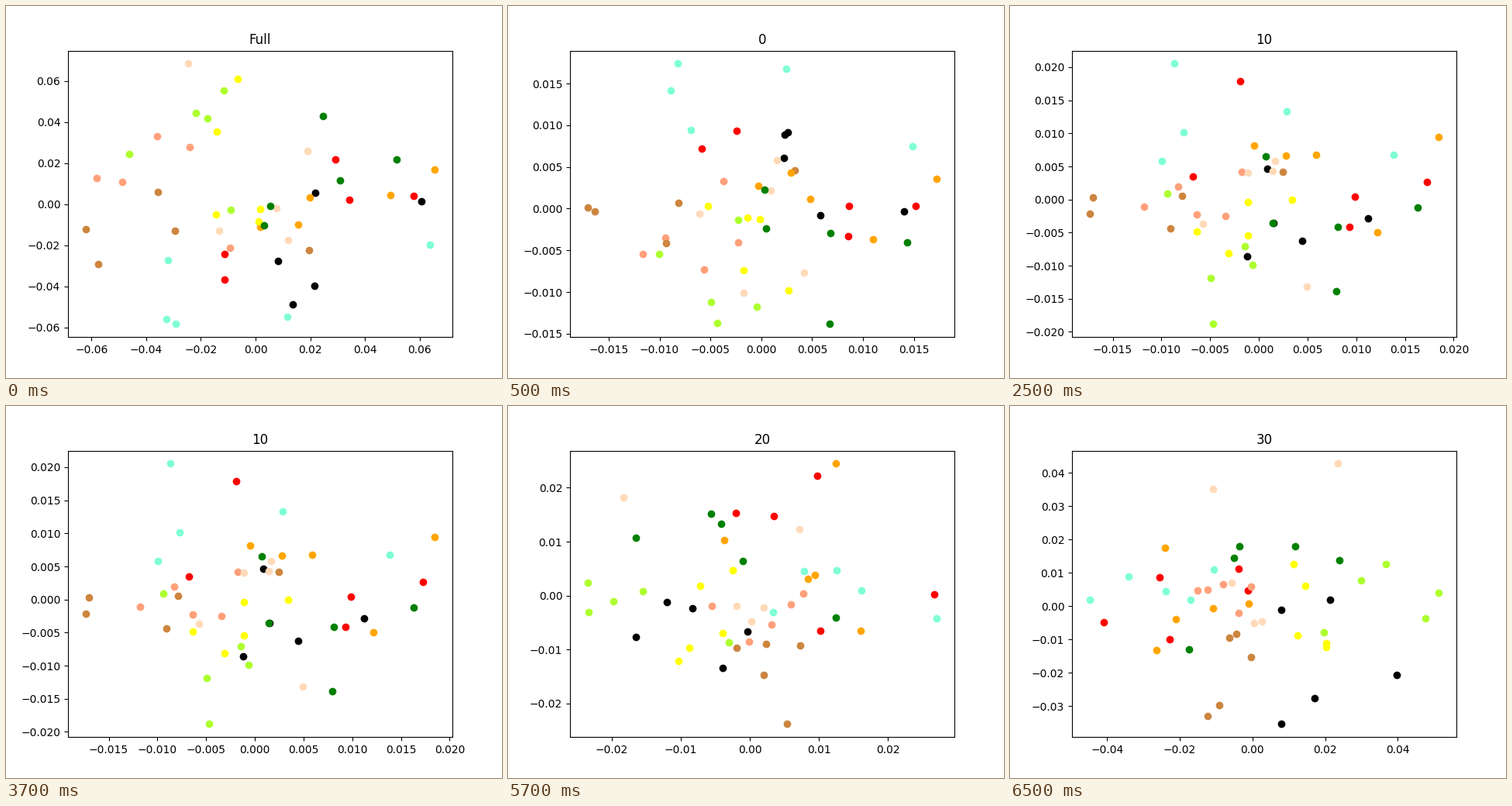
Animation of 640 by 480 pixels, one loop 8000 ms. Source, as a matplotlib script:

```python
import matplotlib.pyplot as plt
import numpy as np
from matplotlib.animation import FuncAnimation

WIDTH, HEIGHT, DPI = 640, 480, 100
STEP_MS = 500
STEPS = 16

fig, ax = plt.subplots(figsize=(WIDTH / DPI, HEIGHT / DPI), dpi=DPI)
box = ax.get_position()
snapshots = []


def to_data(points, xlim, ylim):
    """Turn stage positions (y down) into data values for the given limits."""
    u = (np.array(points, float) / (WIDTH, HEIGHT) - (box.x0, 1 - box.y1)) / box.size
    x = xlim[0] + u[:, 0] * (xlim[1] - xlim[0])
    y = ylim[1] - u[:, 1] * (ylim[1] - ylim[0])
    return x, y


def snapshot(title, xlim, ylim, **clusters):
    """Register one scatter plot; clusters are drawn in the order given."""
    data = {color: to_data(points, xlim, ylim) for color, points in clusters.items()}
    snapshots.append((title, xlim, ylim, data))


snapshot(
    "Full", (-0.0686, 0.0720), (-0.06479, 0.07468),
    black=[(399, 241), (536, 252), (351, 329), (398, 361), (370, 385)],
    red=[(425, 198), (443, 250), (526, 245), (282, 320), (282, 353)],
    lightsalmon=[(195, 168), (237, 182), (117, 222), (150, 227), (289, 312)],
    peachpuff=[(235, 74), (389, 187), (349, 261), (275, 290), (364, 302)],
    peru=[(196, 240), (103, 288), (218, 290), (119, 333), (391, 315)],
    orange=[(553, 211), (496, 244), (392, 247), (377, 282), (328, 285)],
    yellow=[(299, 94), (272, 162), (271, 269), (328, 262), (326, 278)],
    greenyellow=[(281, 109), (245, 138), (260, 145), (159, 191), (290, 263)],
    green=[(409, 142), (504, 198), (431, 225), (341, 258), (333, 283)],
    aquamarine=[(209, 328), (547, 308), (207, 404), (219, 410), (363, 401)],
)
snapshot(
    "0", (-0.018807, 0.01899), (-0.01541, 0.01896),
    black=[(357, 166), (361, 163), (356, 196), (403, 270), (511, 265)],
    red=[(295, 161), (250, 184), (440, 258), (526, 258), (439, 297)],
    lightsalmon=[(278, 226), (203, 299), (174, 320), (297, 305), (253, 340)],
    peachpuff=[(347, 199), (339, 238), (247, 268), (304, 370), (382, 344)],
    peru=[(103, 260), (112, 265), (220, 254), (204, 306), (370, 212)],
    orange=[(553, 223), (365, 215), (323, 232), (390, 249), (471, 301)],
    yellow=[(258, 258), (309, 273), (325, 275), (304, 341), (362, 367)],
    greenyellow=[(297, 276), (195, 320), (262, 382), (270, 409), (321, 388)],
    green=[(331, 237), (333, 287), (416, 293), (515, 305), (415, 410)],
    aquamarine=[(219, 74), (210, 109), (236, 160), (359, 81), (522, 181)],
)
snapshot(
    "10", (-0.01918, 0.02029), (-0.02079, 0.0225),
    black=[(332, 210), (462, 274), (377, 303), (306, 323), (340, 280)],
    red=[(297, 97), (236, 220), (538, 227), (445, 246), (438, 285)],
    lightsalmon=[(299, 214), (217, 233), (173, 259), (241, 269), (278, 271)],
    peachpuff=[(342, 200), (339, 213), (307, 215), (249, 281), (383, 362)],
    peru=[(107, 247), (103, 268), (222, 245), (207, 287), (352, 214)],
    orange=[(315, 180), (356, 193), (395, 192), (553, 169), (474, 292)],
    yellow=[(364, 250), (307, 253), (241, 291), (307, 296), (282, 319)],
    greenyellow=[(203, 242), (303, 310), (313, 334), (259, 351), (262, 410)],
    green=[(330, 194), (339, 280), (423, 285), (526, 260), (421, 368)],
    aquamarine=[(212, 74), (224, 163), (196, 200), (357, 136), (495, 192)],
)
snapshot(
    "20", (-0.02604, 0.02963), (-0.02624, 0.02687),
    black=[(205, 253), (238, 261), (165, 298), (309, 291), (277, 338)],
    red=[(399, 90), (294, 138), (343, 142), (550, 243), (403, 290)],
    lightsalmon=[(263, 258), (381, 242), (365, 256), (340, 282), (311, 304)],
    peachpuff=[(149, 118), (376, 159), (295, 258), (330, 260), (314, 278)],
    peru=[(295, 312), (333, 307), (377, 309), (330, 347), (360, 410)],
    orange=[(423, 74), (279, 173), (396, 218), (387, 223), (455, 290)],
    yellow=[(290, 212), (248, 232), (277, 293), (234, 312), (220, 329)],
    greenyellow=[(103, 228), (104, 266), (136, 252), (174, 239), (285, 305)],
    green=[(262, 139), (275, 152), (165, 170), (303, 200), (423, 273)],
    aquamarine=[(382, 213), (424, 212), (456, 238), (342, 266), (553, 274)],
)
snapshot(
    "30", (-0.04964, 0.05612), (-0.03927, 0.04661),
    black=[(413, 250), (350, 263), (499, 347), (393, 377), (350, 410)],
    red=[(295, 210), (193, 221), (307, 238), (121, 279), (206, 301)],
    lightsalmon=[(242, 238), (255, 237), (275, 230), (311, 233), (295, 267)],
    peachpuff=[(423, 74), (262, 107), (286, 228), (315, 280), (325, 278)],
    peru=[(283, 299), (292, 294), (311, 324), (270, 386), (255, 400)],
    orange=[(200, 183), (262, 261), (308, 255), (214, 275), (189, 315)],
    yellow=[(366, 204), (381, 232), (371, 296), (408, 306), (408, 311)],
    greenyellow=[(485, 204), (453, 225), (553, 241), (536, 274), (405, 292)],
    green=[(296, 181), (289, 196), (368, 181), (425, 199), (231, 314)],
    aquamarine=[(153, 220), (263, 211), (201, 239), (233, 250), (103, 250)],
)


def draw(step):
    # The first plot holds for one step, the later ones for four.
    title, xlim, ylim, data = snapshots[(step + 3) // 4]
    ax.clear()
    for color, (x, y) in data.items():
        ax.scatter(x, y, color=color)
    ax.set(title=title, xlim=xlim, ylim=ylim)


anim = FuncAnimation(fig, draw, frames=STEPS, init_func=lambda: draw(0),
                     interval=STEP_MS, repeat=True, repeat_delay=0)
plt.show()
```
